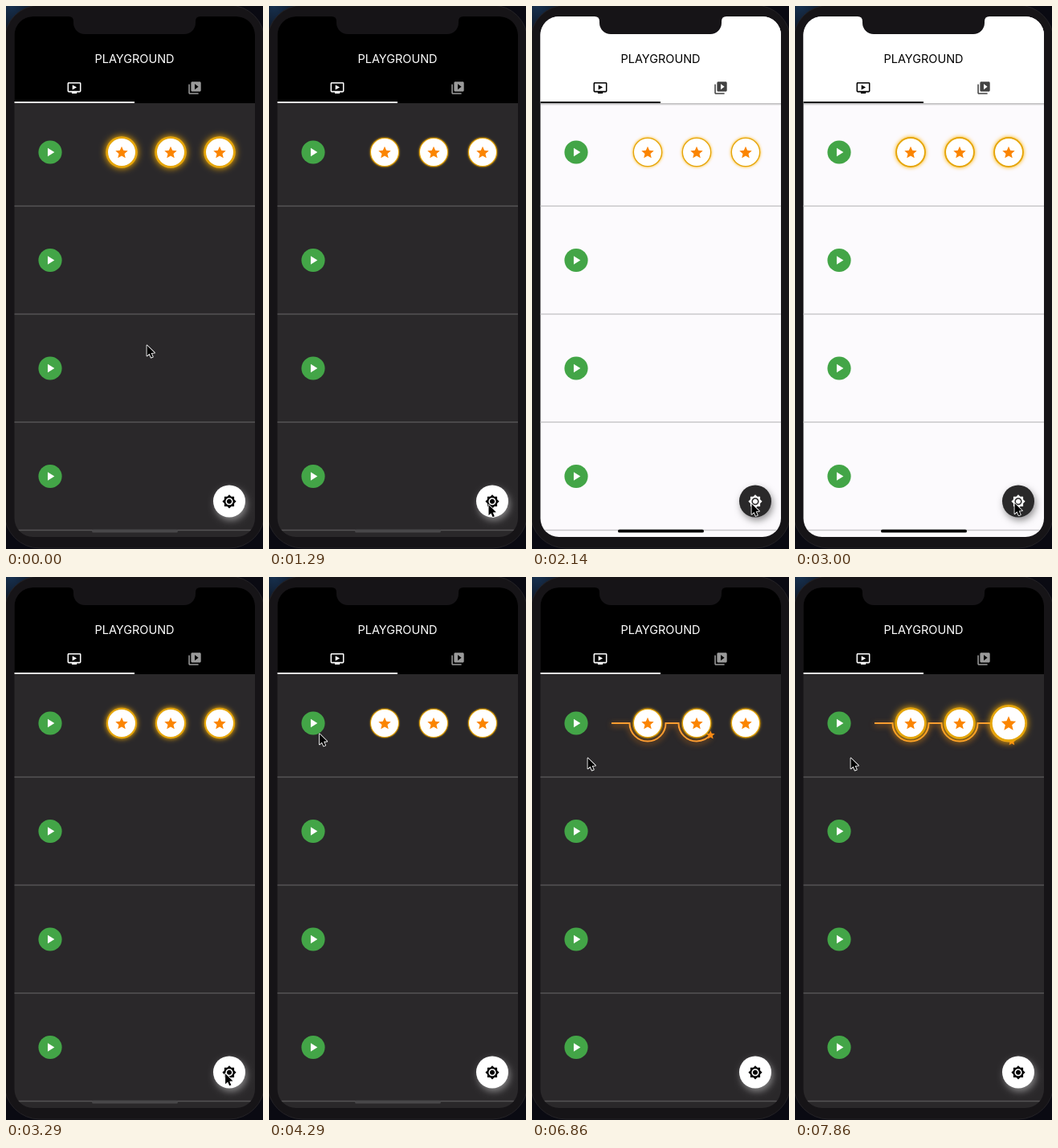
These frames come from a looping animation (320 px wide and 676 px high, 8 s). An HTML page with a canvas:

```html
<!DOCTYPE html>
<html lang="en">
<head>
<meta charset="utf-8">
<title>Playground</title>
<style>
  html, body { margin: 0; width: 100%; height: 100%; overflow: hidden; background: #0b0c12; }
  canvas { display: block; width: 320px; height: 676px; }
</style>
</head>
<body>
<canvas id="stage"></canvas>
<script>
const W = 320, H = 676, LOOP = 8000;
const canvas = document.getElementById('stage');
const dpr = window.devicePixelRatio || 1;
canvas.width = W * dpr;
canvas.height = H * dpr;
const ctx = canvas.getContext('2d');

// 24-unit icons
const ICONS = {
  video: new Path2D('M21 3H3c-1.11 0-2 .89-2 2v12c0 1.1.89 2 2 2h5v2h8v-2h5c1.1 0 1.99-.9 1.99-2L23 5c0-1.11-.9-2-2-2zm0 14H3V5h18v12zm-5-6l-7 4V7z'),
  library: new Path2D('M4 6H2v14c0 1.1.9 2 2 2h14v-2H4V6zm16-4H8c-1.1 0-2 .9-2 2v12c0 1.1.9 2 2 2h12c1.1 0 2-.9 2-2V4c0-1.1-.9-2-2-2zm-8 12.5v-9l6 4.5-6 4.5z'),
  sun: new Path2D('M20 8.69V4h-4.69L12 .69 8.69 4H4v4.69L.69 12 4 15.31V20h4.69L12 23.31 15.31 20H20v-4.69L23.31 12 20 8.69zM12 18c-3.31 0-6-2.69-6-6s2.69-6 6-6 6 2.69 6 6-2.69 6-6 6zm0-10c-2.21 0-4 1.79-4 4s1.79 4 4 4 4-1.79 4-4-1.79-4-4-4z'),
  star: new Path2D('M12 17.27L18.18 21l-1.64-7.03L22 9.24l-7.19-.61L12 2 9.19 8.63 2 9.24l5.46 4.73L5.82 21z'),
  play: new Path2D('M8 5v14l11-7z')
};
const POINTER = new Path2D('M0 0V13L3 10.3 5.1 15.1 7.3 14.2 5.2 9.5 9.4 9.2Z');

const clamp = x => Math.max(0, Math.min(1, x));
const ramp = (t, from, to) => clamp((t - from) / (to - from));
const mix = (a, b, k) => a + (b - a) * k;
const tone = (a, b, k) => `rgb(${a.map((v, i) => Math.round(mix(v, b[i], k)))})`;
const grey = (a, b, k) => tone([a, a, a], [b, b, b], k);

function icon(path, x, y, scale, color) {
  ctx.save();
  ctx.translate(x, y);
  ctx.scale(scale, scale);
  ctx.translate(-12, -12);
  ctx.fillStyle = color;
  ctx.fill(path, 'evenodd');
  ctx.restore();
}

function disc(x, y, r, color) {
  ctx.beginPath();
  ctx.arc(x, y, r, 0, Math.PI * 2);
  ctx.fillStyle = color;
  ctx.fill();
}

function pill(x, y, w, h, r, color) {
  ctx.beginPath();
  ctx.roundRect(x, y, w, h, r);
  ctx.fillStyle = color;
  ctx.fill();
}

function shadow(color, blur, dx = 0, dy = 0) {
  ctx.shadowColor = color;
  ctx.shadowBlur = blur * dpr;
  ctx.shadowOffsetX = dx * dpr;
  ctx.shadowOffsetY = dy * dpr;
}
const noShadow = () => shadow('transparent', 0);

// Track of the flying star: straight pieces joined by half circles
const ROW_Y = 182, ROW_STEP = 134.5, STOPS = [144, 205, 266];
const ORBIT = 22.5, HALF = Math.PI * ORBIT, TRACK_X = 99;
const track = new Path2D();
const arcStarts = [];
{
  let x = TRACK_X, length = 0;
  track.moveTo(x, ROW_Y);
  for (const cx of STOPS) {
    length += cx - ORBIT - x;
    arcStarts.push(length);
    track.lineTo(cx - ORBIT, ROW_Y);
    track.arc(cx, ROW_Y, ORBIT, Math.PI, 0, true);
    length += HALF;
    x = cx + ORBIT;
  }
}

function trackPoint(d) {
  for (let i = STOPS.length - 1; i >= 0; i--) {
    const past = d - arcStarts[i];
    if (past < 0) continue;
    if (past > HALF) return [STOPS[i] + ORBIT + past - HALF, ROW_Y];
    const a = Math.PI - past / ORBIT;
    return [STOPS[i] + ORBIT * Math.cos(a), ROW_Y + ORBIT * Math.sin(a)];
  }
  return [TRACK_X + d, ROW_Y];
}

// Keys are [time, value, ...]; ease shapes every span
function follow(keys, t, ease = k => k) {
  let i = 0;
  while (i < keys.length - 2 && t > keys[i + 1][0]) i++;
  const [a, b] = [keys[i], keys[i + 1]];
  const k = ease(ramp(t, a[0], b[0]));
  return a.slice(1).map((v, n) => mix(v, b[n + 1], k));
}

const TRAVEL = [[4430, 0], [5290, 57.8], [6860, 164.2], [8000, 245]];
const MOUSE = [
  [150, 175, 422], [1100, 273, 621], [3290, 273, 618.5],
  [4330, 62, 194], [5400, 62, 194], [5900, 69, 225]
];
const easeOut = k => 1 - Math.pow(1 - k, 1.9);

function drawDesk() {
  ctx.fillStyle = '#0a0a12';
  ctx.fillRect(0, 0, W, H);
  const glow = ctx.createRadialGradient(6, 0, 0, 6, 0, 45);
  glow.addColorStop(0, '#17304e');
  glow.addColorStop(1, '#0a0c14');
  ctx.fillStyle = glow;
  ctx.fillRect(0, 0, 60, 60);
  pill(-2, -1, 324, 676, 44, '#161417');
  ctx.strokeStyle = '#242226';
  ctx.lineWidth = 1;
  ctx.stroke();
}

function drawNotch() {
  ctx.beginPath();
  ctx.moveTo(78, 12);
  ctx.lineTo(78, 13);
  ctx.quadraticCurveTo(84, 13, 84, 19);
  ctx.arcTo(84, 35, 100, 35, 14);
  ctx.arcTo(236, 35, 236, 19, 14);
  ctx.lineTo(236, 19);
  ctx.quadraticCurveTo(236, 13, 242, 13);
  ctx.lineTo(242, 12);
  ctx.fillStyle = '#161417';
  ctx.fill();
}

function drawBar(k) {
  const inkMix = clamp(k * 1.2);
  const ink = grey(255, 0, inkMix);
  if (k > 0) {
    const edge = ctx.createLinearGradient(0, 120, 0, 124);
    edge.addColorStop(0, `rgba(0,0,0,${0.4 * k})`);
    edge.addColorStop(1, 'rgba(0,0,0,0)');
    ctx.fillStyle = edge;
    ctx.fillRect(10, 120, 300, 4);
  }
  ctx.fillStyle = grey(0, 255, k);
  ctx.fillRect(10, 13, 300, 108);
  ctx.font = '400 14.5px Inter, Roboto, sans-serif';
  ctx.textAlign = 'center';
  ctx.textBaseline = 'alphabetic';
  ctx.fillStyle = ink;
  ctx.fillText('PLAYGROUND', 160, 70.5);
  icon(ICONS.video, 85, 102, 0.77, ink);
  icon(ICONS.library, 235, 102, 0.77, grey(154, 66, inkMix));
  ctx.fillStyle = k < 0.7 ? '#fff' : '#000';
  ctx.fillRect(10, 119, 150, 1.8);
}

function drawRows(k) {
  ctx.fillStyle = tone([85, 83, 85], [201, 200, 202], Math.pow(k, 1.4));
  for (let i = 0; i < 4; i++) ctx.fillRect(10, 248.3 + i * ROW_STEP, 300, 1.5);
  for (let i = 0; i < 4; i++) {
    const y = ROW_Y + i * ROW_STEP;
    disc(55, y, 14.6, '#43a547');
    icon(ICONS.play, 55, y, 0.76, '#fff');
  }
}

function drawTrail(d) {
  if (d <= 0) return;
  ctx.save();
  shadow('rgba(255,140,20,.75)', 7, 0, 2);
  ctx.strokeStyle = '#ff9d30';
  ctx.lineWidth = 2;
  ctx.setLineDash([d, 999]);
  ctx.stroke(track);
  ctx.restore();
  const [x, y] = trackPoint(d);
  icon(ICONS.star, x, y + 0.2, 0.54, '#fb8a14');
}

function drawStops(t, d) {
  const glow = Math.pow(0.5 + 0.5 * Math.cos(t / 790 * Math.PI * 2), 1.5);
  STOPS.forEach((x, i) => {
    const past = (d - arcStarts[i] - HALF / 2) / 14;
    const bump = past > 0 && past < 1 ? Math.sin(past * Math.PI) : 0;
    const size = 1 + 0.25 * bump;
    const r = 17 * size;
    shadow('#ffb300', 2 + 7 * glow);
    disc(x, ROW_Y, r + 0.9 + 1.9 * glow, '#e5a50a');
    noShadow();
    disc(x, ROW_Y, r, '#fff');
    icon(ICONS.star, x, ROW_Y + 0.4, 0.77 * size, '#fb8500');
  });
}

function drawButton(k) {
  const s = Math.round(mix(255, 0, k * k));
  shadow(`rgba(${s},${s},${s},.42)`, 8, 2, 4);
  disc(278, 616.5, 20, tone([255, 255, 255], [42, 41, 42], clamp(k * 1.3)));
  noShadow();
  icon(ICONS.sun, 278, 616.8, 0.76, grey(0, 255, k));
}

function drawHome(k, t) {
  const lit = k > 0.3;
  ctx.globalAlpha = lit ? 1 : 1 - ramp(t, 5400, 6300);
  pill(107, 651.8, 107, 3.8, 2, lit ? '#000' : '#484749');
  ctx.globalAlpha = 1;
}

function drawPointer(t) {
  const [x, y] = follow(MOUSE, t, easeOut);
  ctx.save();
  ctx.translate(x + 0.5, y + 0.5);
  ctx.lineJoin = 'round';
  ctx.lineWidth = 1.7;
  ctx.strokeStyle = '#fff';
  ctx.stroke(POINTER);
  ctx.fillStyle = '#000';
  ctx.fill(POINTER);
  ctx.restore();
}

function draw(t) {
  const k = ramp(t, 1769, 1969) - ramp(t, 3050, 3250);
  const d = follow(TRAVEL, t)[0];
  ctx.setTransform(dpr, 0, 0, dpr, 0, 0);
  drawDesk();
  ctx.save();
  ctx.beginPath();
  ctx.roundRect(10.5, 13, 299.5, 648, 23);
  ctx.clip();
  ctx.fillStyle = tone([42, 40, 42], [252, 250, 253], k);
  ctx.fillRect(10, 13, 300, 648);
  drawRows(k);
  drawTrail(d);
  drawStops(t, d);
  drawBar(k);
  drawButton(k);
  drawHome(k, t);
  ctx.restore();
  drawNotch();
  drawPointer(t);
}

const start = performance.now();
function tick() {
  draw((performance.now() - start) % LOOP);
  requestAnimationFrame(tick);
}
tick();
</script>
</body>
</html>
```
